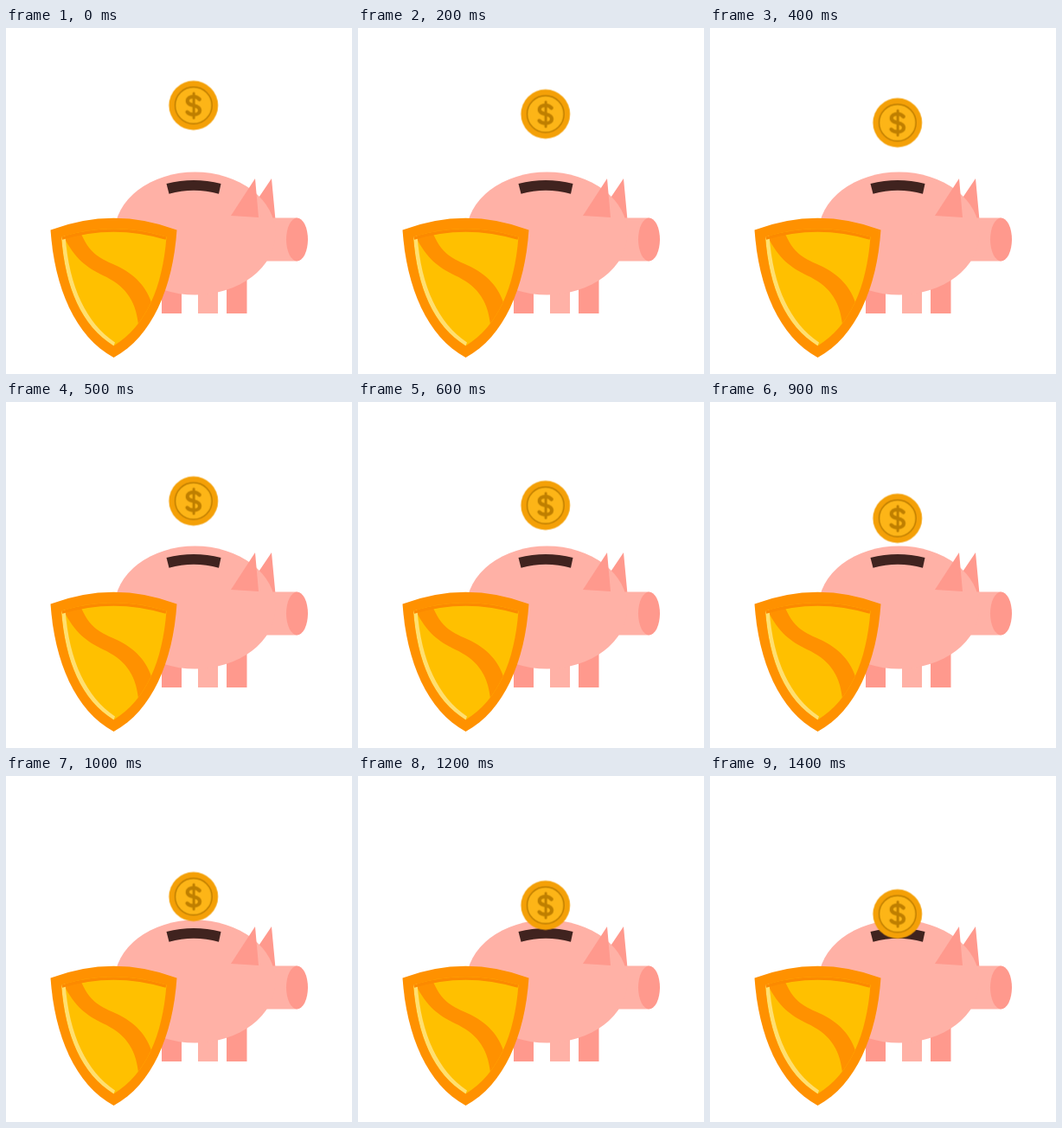
Recreate the animation shown at these times as an HTML page. Size 400 by 400 pixels, loop 1500 ms.

```html
<!DOCTYPE html>
<html lang="en">
<head>
<meta charset="utf-8">
<title>Savings</title>
<style>
  html, body { margin: 0; width: 100%; height: 100%; overflow: hidden; background: #fff; }
  svg { display: block; width: 100vw; height: 100vh; }
  .skin { fill: #ffb1a6; }
  .shade { fill: #ff998d; }
</style>
</head>
<body>
<svg viewBox="0 0 400 400">
  <defs>
    <clipPath id="plate">
      <path d="M64 241.5Q124.5 223 185.5 241.5C181 300 162 344 124.5 367.5C87 344 68.500 300 64 241.500Z"/>
    </clipPath>
  </defs>

  <g id="pig">
    <path class="shade" d="M180 270h23v60h-23zM255 270h23.500v60h-23.500zM278 217L307 174L311.500 222Z"/>
    <path class="skin" d="M222 290h23v40h-23zM290 219.500h46.500v50h-46.500z"/>
    <ellipse class="skin" cx="218.500" cy="237.500" rx="93" ry="71"/>
    <ellipse class="shade" cx="336.500" cy="244.500" rx="12.500" ry="25"/>
    <path class="shade" d="M260 217L288 174L292 219Z"/>
    <path fill="#40231f" d="M185.500 180Q217 171.800 248.500 180L246 191.700Q217 183.800 188.500 191.700Z"/>
  </g>

  <g id="shield">
    <path fill="#ff9100" d="M51.500 233.500Q124.500 206 197.500 233.500C193 300 169 357 124.500 381C80 357 56 300 51.500 233.500Z"/>
    <g clip-path="url(#plate)">
      <path fill="#ffc000" d="M50 220h150v160h-150z"/>
      <path fill="#ff9100" d="M66 240C80 268 94 277 112 286C136 297 150 313 153 343L175 335L169 320C163 300 150 285 126 274C105 265 96 259 86 236Z"/>
      <path fill="#ffdf70" d="M64 241.500C68.500 300 87 344 124.500 367.500L126 363.500C93 341 73 300 68.500 240Z"/>
      <path fill="none" stroke="#fc8a00" stroke-width="7" d="M64 241.500Q124.500 223 185.500 241.500"/>
    </g>
  </g>

  <g transform="translate(216.700 89.500)">
    <g id="coin">
      <circle r="28.400" fill="#f4a007"/>
      <circle r="21.300" fill="#fdb517" stroke="#bc7c00" stroke-width="1.400"/>
      <g fill="none" stroke="#bf7f00" stroke-linecap="round">
        <path stroke-width="4.200" d="M7 -7C5 -9.300 2.800 -10.200 0 -10.200C-4.200 -10.200 -7 -8.300 -7 -5.200C-7 -1.800 -3.600 -.9 0 0C4 .9 7.300 2.200 7.300 5.700C7.300 8.800 4.200 10.700 0 10.700C-3.200 10.700 -5.600 9.700 -7.300 7.700"/>
        <path stroke-width="3" d="M.3 -14V14.500"/>
      </g>
    </g>
  </g>
</svg>
<script>
  const LOOP = 1500, STEPS = 15, DROP = 75;

  document.getElementById('coin').animate(
    [{ transform: 'translateY(0px)' }, { transform: `translateY(${DROP}px)` }],
    { duration: LOOP, iterations: Infinity, easing: `steps(${STEPS}, end)` }
  );
</script>
</body>
</html>
```
